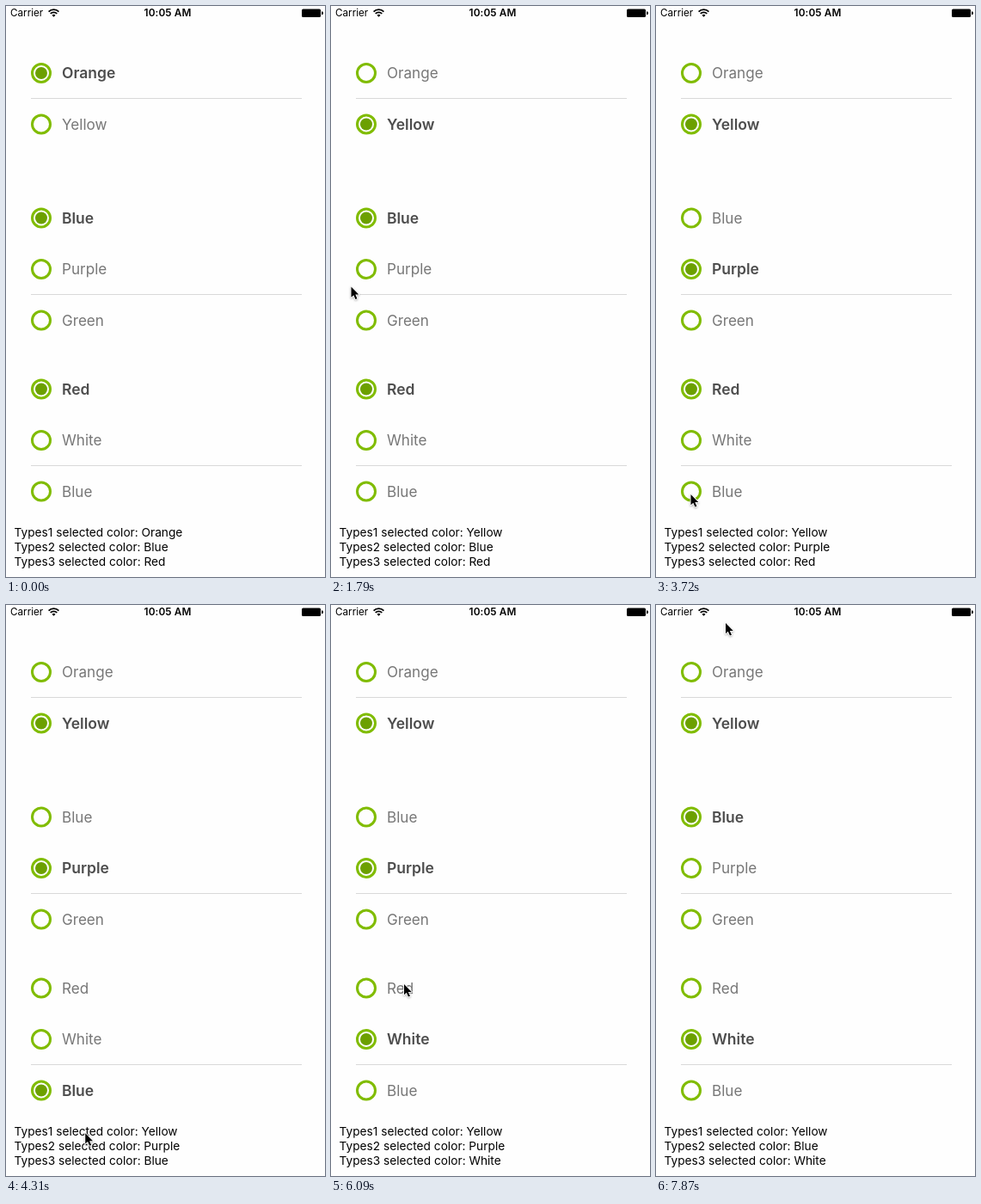
Write an HTML page that moves like this. It is 371 px wide and 664 px high and loops after 8000 ms.

```html
<!DOCTYPE html>
<html lang="en">
<head>
<meta charset="utf-8">
<title>Radio buttons</title>
<style>
html, body { margin: 0; width: 100%; height: 100%; overflow: hidden; background: #fefefe; }
svg { display: block; width: 371px; height: 664px; font-family: Inter, Roboto, sans-serif; }
.ring { fill: none; stroke: #80bc00; stroke-width: 3; }
.pressed .ring { opacity: .8; }
.dot { fill: #6ca000; }
.label { font-size: 17.1px; fill: #777; }
.on .label { font-size: 17.5px; font-weight: 600; fill: #4d4d4d; }
.rule { stroke: #d9d9d9; }
.status { font-size: 11.7px; }
.time { font-size: 11.8px; font-weight: 600; text-anchor: middle; letter-spacing: .1px; }
.log { font-size: 13.7px; }
.wifi { fill: none; stroke: #000; stroke-width: 1.7; }
.cursor { filter: drop-shadow(0 1px 1px rgba(0, 0, 0, .3)); }
.cursor path { stroke: #fff; stroke-width: 2; paint-order: stroke; stroke-linejoin: round; }
</style>
</head>
<body>
<svg viewBox="0 0 371 664">
  <text class="status" x="5" y="12.3">Carrier</text>
  <g class="wifi">
    <path d="M49.6 6.6a8.3 8.3 0 0 1 11.8 0"/>
    <path d="M51.7 8.9a5.3 5.3 0 0 1 7.6 0"/>
  </g>
  <path d="M55.5 12.8l-2-2.1a2.9 2.9 0 0 1 4 0z"/>
  <text class="time" x="188" y="12.3">10:05 AM</text>
  <rect x="344" y="3.5" width="22" height="9.5" rx="1.5"/>
  <path d="M367 6.2a2 2 0 0 1 0 4z"/>
  <path class="rule" d="M29 107.5H344M29 335.5H344M29 534.5H344"/>
  <g id="rows"></g>
  <g id="logs"></g>
  <g id="cursor" class="cursor">
    <path transform="scale(.88)" d="M0 0V14L3.2 11L5.6 16.5L7.9 15.5L5.5 10.2H10Z"/>
  </g>
</svg>
<script>
const LOOP = 8000;
const TICKS = 54;      // the picture advances in even ticks
const ROW = 59.5;

const groups = [
  { names: ['Orange', 'Yellow'], top: 78 },
  { names: ['Blue', 'Purple', 'Green'], top: 246.5 },
  { names: ['Red', 'White', 'Blue'], top: 445.5 }
];

// A click on the ring itself dims it for one tick first.
const clicks = [
  { at: 7, group: 0, row: 1, onRing: true },
  { at: 18, group: 1, row: 1, onRing: true },
  { at: 28, group: 2, row: 2, onRing: true },
  { at: 38, group: 2, row: 1 },
  { at: 49, group: 1, row: 0 }
];

// Cursor glides: start tick, length in ticks, end point; it rests in between.
const enter = { at: 4, x: 28, y: 190 };
const glides = [
  [4, 2, 42, 140],
  [10, 2, 23.5, 326.5],
  [12, 1, 32, 381],
  [13, 2, 43.5, 316],
  [16, 1, 43.5, 309],
  [21, 4, 40.5, 568],
  [28, 4, 130, 648],
  [32, 2, 145.5, 626],
  [34, 2, 84, 520],
  [39, 2, 85, 441],
  [41, 4, 81, 257],
  [48, 1, 81, 245],
  [52, 1, 81, 21]
];

const easeOut = p => 1 - (1 - p) ** 3;
const clamp = p => Math.max(0, Math.min(1, p));

function add(parent, tag, attrs) {
  const el = document.createElementNS('http://www.w3.org/2000/svg', tag);
  for (const key in attrs) el.setAttribute(key, attrs[key]);
  return parent.appendChild(el);
}

const rowBox = document.getElementById('rows');
const logBox = document.getElementById('logs');
const cursor = document.getElementById('cursor');

groups.forEach((group, i) => {
  group.rows = group.names.map((name, k) => {
    const y = group.top + ROW * k;
    const el = add(rowBox, 'g', {});
    add(el, 'circle', { class: 'ring', cx: 41, cy: y, r: 10.5 });
    const dot = add(el, 'circle', { class: 'dot', cx: 41, cy: y });
    add(el, 'text', { class: 'label', x: 65, y: y + 6.2 }).textContent = name;
    return { el, dot };
  });
  group.log = add(logBox, 'text', { class: 'log', x: 9.5, y: 617 + 17 * i });
});

function drawGroup(group, i, tick) {
  const mine = clicks.filter(c => c.group === i);
  const last = mine.filter(c => c.at <= tick).pop() || { at: -TICKS, row: 0 };
  const held = mine.find(c => c.onRing && c.at === tick + 1);
  const grow = clamp((tick - last.at + 1) / 2);
  group.rows.forEach(({ el, dot }, k) => {
    const on = k === last.row;
    el.classList.toggle('on', on);
    el.classList.toggle('pressed', !!held && held.row === k);
    dot.setAttribute('r', on ? 7 * grow : 0);
  });
  group.log.textContent = `Types${i + 1} selected color: ${group.names[last.row]}`;
}

function drawCursor(tick) {
  let { x, y } = enter;
  for (const [from, length, toX, toY] of glides) {
    const p = easeOut(clamp((tick - from) / length));
    x += (toX - x) * p;
    y += (toY - y) * p;
  }
  cursor.setAttribute('visibility', tick < enter.at ? 'hidden' : 'visible');
  cursor.setAttribute('transform', `translate(${x} ${y})`);
}

const start = performance.now();
function frame() {
  const t = (performance.now() - start) % LOOP;
  const tick = Math.floor(t / LOOP * TICKS + .05);
  groups.forEach((group, i) => drawGroup(group, i, tick));
  drawCursor(tick);
  requestAnimationFrame(frame);
}
frame();
</script>
</body>
</html>
```
